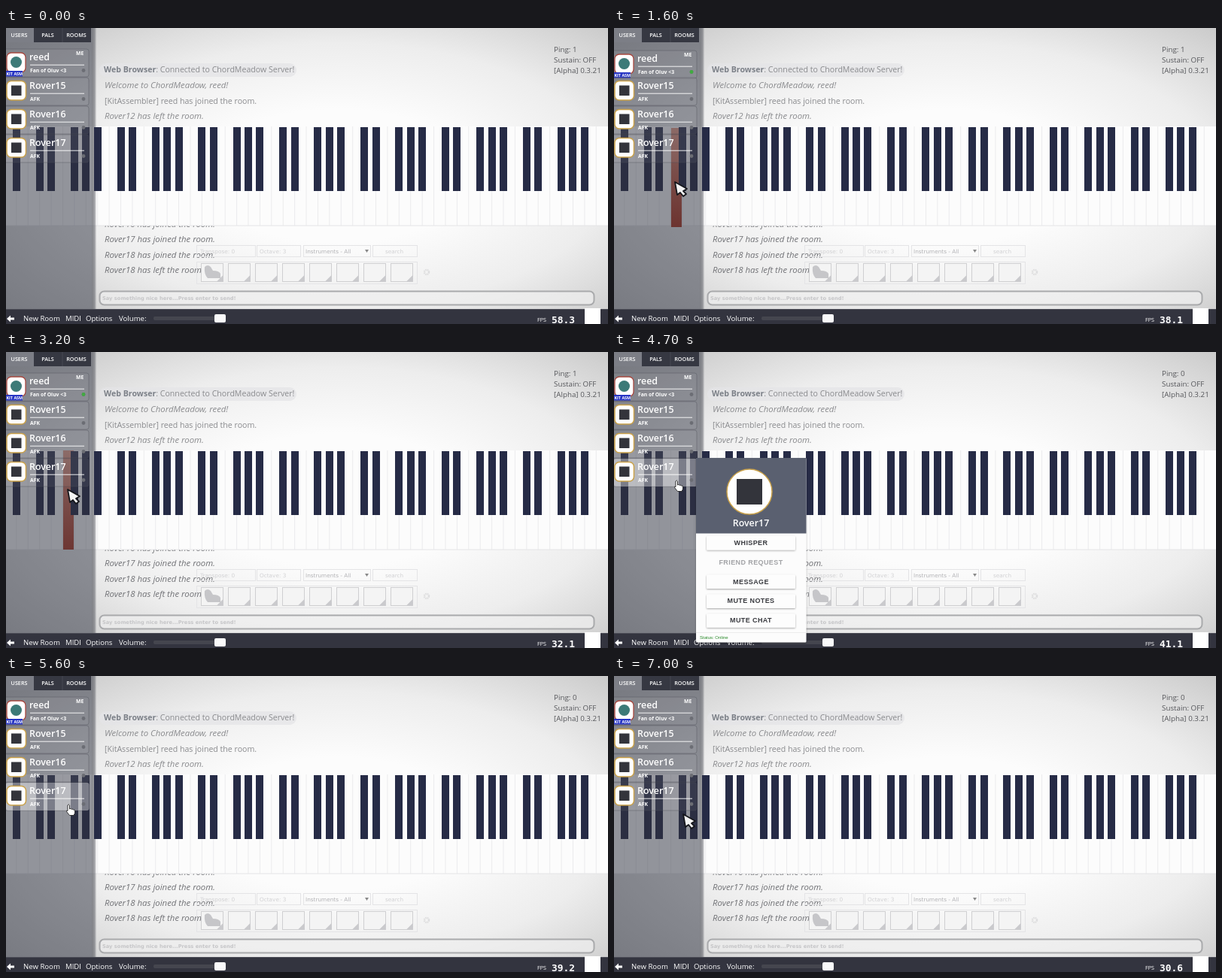
Write an HTML page that moves like this. It is 800 px wide and 394 px high and loops after 7.1 s.

```html
<!DOCTYPE html>
<html lang="en">
<head>
<meta charset="utf-8">
<title>Piano room</title>
<style>
html, body { margin: 0; width: 100%; height: 100%; overflow: hidden; background: #fff; }
svg { display: block; width: 800px; height: 394px; }
text { font-family: "Open Sans", "Noto Sans", sans-serif; white-space: pre; }
.chat { font-size: 10.6px; fill: #8a8b8e; }
.it { font-size: 11.4px; font-style: italic; fill: #717276; }
.old { fill: #8a8b8e; }
.info { font-size: 9.8px; fill: #55565a; }
.tab { font-size: 7.2px; font-weight: 600; fill: #fff; text-anchor: middle; }
.name { font-size: 12.4px; font-weight: 600; fill: #fff; }
.sub { font-size: 6.8px; font-weight: 700; fill: #fff; }
.menu { font-size: 9.6px; fill: #fff; }
.tool { font: 7.3px "DejaVu Sans", sans-serif; fill: #d2d2d4; }
.btn { font: bold 9px "Liberation Sans", Arial, sans-serif; letter-spacing: .4px; text-anchor: middle; fill: #3a3b40; }
.fps { font: bold 12.9px "DejaVu Sans Mono", monospace; fill: #fff; }
</style>
</head>
<body>
<svg id="stage" viewBox="0 0 800 394" xmlns="http://www.w3.org/2000/svg"></svg>
<script>
const LOOP = 7100, STEP = 100;
const PITCH = 15.41, KEY_X = -1.6, KEY_Y = 131, KEY_H = 132;

const rect = (x, y, w, h, fill, more = '') =>
  `<rect x="${x}" y="${y}" width="${w}" height="${h}" fill="${fill}" ${more}/>`;
const line = (x1, y1, x2, y2, stroke, more = '') =>
  `<path d="M${x1} ${y1}L${x2} ${y2}" stroke="${stroke}" ${more}/>`;
const text = (x, y, cls, s, more = '') =>
  `<text x="${x}" y="${y}" class="${cls}" ${more}>${s}</text>`;
const group = (id, body, more = '') => `<g id="${id}" ${more}>${body}</g>`;
const range = n => [...Array(n).keys()];

const defs = `<defs>
  <radialGradient id="vignette" cx=".55" cy=".5" r=".75">
    <stop offset=".3" stop-color="#fcfcfc"/><stop offset=".6" stop-color="#ededed"/>
    <stop offset=".8" stop-color="#d6d6d6"/><stop offset="1" stop-color="#bebebe"/>
  </radialGradient>
  <linearGradient id="red" x2="0" y2="1">
    <stop offset="0" stop-color="#85605c"/><stop offset="1" stop-color="#6b302c"/>
  </linearGradient>
  <linearGradient id="edge">
    <stop offset="0" stop-color="#55575f" stop-opacity=".7"/>
    <stop offset=".6" stop-color="#55575f" stop-opacity=".55"/>
    <stop offset="1" stop-color="#55575f" stop-opacity=".1"/>
  </linearGradient>
  <filter id="soft" x="-20%" y="-20%" width="140%" height="150%">
    <feDropShadow dx="0" dy="1" stdDeviation="1.2" flood-opacity=".35"/>
  </filter>
</defs>`;

function chat() {
  const left = n => `Rover${n} has left the room.`;
  const joined = n => `Rover${n} has joined the room.`;
  const italics = [
    [80, 'Welcome to ChordMeadow, reed!'], [121, left(12)],
    [265, joined(16)], [285, joined(17)], [306, joined(18)], [326, left(18)]
  ];
  return rect(124, 47, 262, 18, '#e4e5e7', 'rx="9" opacity=".75"') +
    text(130, 59.3, 'chat', '<tspan font-weight="700" fill="#7c8088">Web Browser</tspan>: Connected to ChordMeadow Server!') +
    text(131, 100.5, 'chat', '[KitAssembler] reed has joined the room.') +
    italics.map(([y, s]) => text(131, y, y < KEY_Y ? 'it old' : 'it', s)).join('');
}

function toolbar() {
  const box = (x, w) => rect(x + .5, 289.5, w, 15, 'none', 'stroke="#e4e4e6"');
  const slot = i => {
    const x = 259.5 + i * 36;
    return rect(x, 313.5, 29, 24, '#f4f4f4', 'stroke="#cfcfd1"') +
      `<path d="M${x + 29} 329v8.500h-8.500z" fill="#cacacd"/>`;
  };
  return box(253, 78) + box(333, 58) + box(395, 89) + box(487, 59) +
    text(258, 300, 'tool', 'Transpose: 0') + text(337, 300, 'tool', 'Octave: 3') +
    text(398, 300, 'tool', 'Instruments - All', 'style="fill:#b4b4b7"') +
    '<path d="M477 295h5l-2.500 4z" fill="#888"/>' +
    text(504, 300, 'tool', 'search') +
    rect(253.5, 311.5, 293, 29, 'none', 'stroke="#e4e4e6"') +
    range(8).map(slot).join('') +
    '<path d="M264 318q4-4 8 0l3 5q8 0 10 4v6h-17q-5-5-4-15z" fill="#c6c6c9"/>' +
    '<circle cx="559" cy="325" r="3" fill="none" stroke="#dededf" stroke-width="2.500" stroke-dasharray="1.600 .8"/>';
}

function piano() {
  const blacks = [1];
  for (let o = 0; o < 7; o++) for (const k of [1, 2, 4, 5, 6]) blacks.push(2 + 7 * o + k);
  const redX = KEY_X + 5 * PITCH + .5;
  return rect(0, KEY_Y, 800, KEY_H, '#fcfcfc') +
    range(52).map(i => line(KEY_X + i * PITCH, KEY_Y, KEY_X + i * PITCH, KEY_Y + KEY_H, '#ebebed')).join('') +
    line(0, KEY_Y + KEY_H, 800, KEY_Y + KEY_H, '#e4e4e6') +
    group('shade', rect(0, 0, 114, 374, '#3a3d4a', 'opacity=".54"') + rect(114, 0, 6, 374, 'url(#edge)')) +
    group('hot', rect(redX, KEY_Y, 14, KEY_H, 'url(#red)'), 'opacity="0"') +
    blacks.map(n => {
      const x = Math.round(PITCH * n - 6.6);
      return rect(x, KEY_Y + 1, 10, 85, x < 110 ? '#2b2e42' : '#262b46');
    }).join('');
}

function user(i, name, note) {
  const y = i * 38, me = i === 0;
  const face = me
    ? rect(1, 33, 25, 26, '#fff', 'rx="6" stroke="#a8483f" stroke-width="1.300"') +
      '<circle cx="13.500" cy="45.500" r="7.500" fill="#3d7a78"/>' +
      rect(0, 57, 22, 7.5, '#2735c4') + text(.5, 63, 'sub', 'KIT ASM', 'style="font-size:5.400px"')
    : rect(1, y + 32.5, 25.5, 25.5, '#fff', 'rx="6" stroke="#c9a14a" stroke-width="1.500"') +
      rect(7, y + 38.5, 13.5, 13.5, '#33343b');
  return group('row' + i,
    `<path d="M0 ${y + 65}H107q3 0 3-3V${y + 31}q0-3-3-3H0" fill="#fff" fill-opacity=".05" stroke="#4c4e58" stroke-opacity=".4"/>` +
    rect(0, y + 28, 110.5, 37, '#fff', `id="glow${i}" rx="3" opacity="0"`) + face +
    text(31, y + 43, 'name', name) +
    (me ? text(93, 35.5, 'sub', 'ME') : '') +
    line(32, y + 49.2, 104, y + 49.2, '#fff', 'stroke-width=".9"') +
    text(32, y + 58.8, 'sub', note) +
    `<circle cx="103" cy="${y + 56.5}" r="2.400" fill="#6b6d74"/>` +
    (me ? '<circle id="dot" cx="103" cy="56.500" r="2.400" fill="#3fae3f" opacity="0"/>' : ''));
}

function sidebar() {
  return rect(0, 0, 37, 19, '#7c7e86') + rect(37, 0, 76, 19, '#363842') +
    line(75, 0, 75, 19, '#464852') +
    [['USERS', 17.5], ['PALS', 55.5], ['ROOMS', 93.5]].map(([s, x]) => text(x, 12, 'tab', s)).join('') +
    user(0, 'reed', 'Fan of Oluv &lt;3') +
    [15, 16, 17].map((n, i) => user(i + 1, 'Rover' + n, 'AFK')).join('');
}

function footer() {
  const items = [[23, 'New Room'], [79, 'MIDI'], [106, 'Options'], [150, 'Volume:']];
  return rect(124.5, 350.5, 657, 18, '#f0f0f0', 'rx="6" stroke="#a9aaac" stroke-width="2" fill-opacity=".7"') +
    text(128, 362, 'tool', 'Say something nice here...Press enter to send!', 'style="font-size:6.700px;font-weight:700;fill:#c6c6c8"') +
    rect(0, 374, 800, 20, '#33343f') + line(0, 374.5, 800, 374.5, '#4d4e58') +
    '<path d="M1 387l5-4.500v3h5v3h-5v3z" fill="#fff"/>' +
    items.map(([x, s]) => text(x, 390, 'menu', s)).join('') +
    rect(196, 384, 96, 5, '#45464f', 'rx="2"') +
    rect(277, 381, 15, 11, '#fafafa', 'rx="2"') +
    text(706, 390.5, 'menu', 'FPS', 'style="font-size:7.200px"') +
    text(725, 392.7, 'fps', '', 'id="fps"') +
    rect(769, 373, 21, 21, '#fff');
}

function popup() {
  const labels = ['WHISPER', 'FRIEND REQUEST', 'MESSAGE', 'MUTE NOTES', 'MUTE CHAT'];
  const button = (s, i) => {
    const y = 245 + i * 25.8, flat = i === 1;
    return (flat ? '' : rect(123, y, 118, 18.5, '#fdfdfd', 'rx="1.500" filter="url(#soft)"')) +
      text(182, y + 12, 'btn', s, flat ? 'style="fill:#a2a3a6"' : '');
  };
  return group('popup',
    rect(109, 141, 146.5, 245.5, '#fcfcfc', 'rx="1.500" filter="url(#soft)"') +
    rect(109, 141, 146.5, 100.5, '#5a6070') +
    '<circle cx="180" cy="186" r="30" fill="#fff" stroke="#c9a14a" stroke-width="1.500"/>' +
    rect(163, 169, 34, 34, '#33343b') +
    text(182, 232, 'name', 'Rover17', 'text-anchor="middle"') +
    labels.map(button).join('') +
    line(109, 373.5, 255.5, 373.5, '#ececec') +
    text(114, 382, 'btn', 'Status: Online',
      'style="font-size:6px;font-weight:400;letter-spacing:0;text-anchor:start;fill:#2a8a2a"'),
    'opacity="0"');
}

const cursors =
  group('arrow', '<path d="M0 0L3 17L7 14L11 19L15 16L11 12L16 9Z" fill="#f4f4f4" stroke="#15161b" stroke-width="1.800" stroke-linejoin="round"/>') +
  group('hand', '<path d="M0 1q1.500-2 2.500 0v5q2-1.300 2.500.4q2-.9 2.500.7q2-.5 2 1.200v3.200l-1.500 3h-5.500l-4-5q-.4-2 1.500-1z" fill="#fff" stroke="#222" stroke-width=".9" stroke-linejoin="round"/>');

document.getElementById('stage').innerHTML = defs +
  rect(0, 0, 800, 394, 'url(#vignette)') + chat() + toolbar() +
  text(728, 32, 'info', '', 'id="ping"') + text(728, 46, 'info', 'Sustain: OFF') +
  text(728, 60, 'info', '[Alpha] 0.3.21') +
  piano() + sidebar() + footer() + popup() + cursors;

const $ = id => document.getElementById(id);
const set = (id, name, value) => $(id).setAttribute(name, value);

// Each row: time, then values, joined linearly
const pointer = [[500, 190, 300], [1200, 81, 205], [2600, 81, 205], [3100, 82, 183], [3200, 82, 183],
  [3500, 82, 171], [6300, 82, 171], [6700, 92, 184], [7100, 92, 184]];
const rates = [[0, 58.3], [1600, 38.1], [2500, 29.6], [3200, 32.1], [4700, 41.1], [5600, 39.2], [7000, 30.6], [7100, 30.6]];
const fade = [[4200, 0], [4400, 1], [5100, 1], [5300, 0]];
const hits = [1500, 3000], RELEASE = 3500;

function at(track, t) {
  if (t <= track[0][0]) return track[0].slice(1);
  const i = track.findIndex(k => k[0] >= t);
  if (i < 0) return track[track.length - 1].slice(1);
  const a = track[i - 1], b = track[i], p = (t - a[0]) / (b[0] - a[0]);
  return a.slice(1).map((v, j) => v + (b[j + 1] - v) * p);
}

function draw(t) {
  const hit = hits.filter(h => h <= t).pop();
  const age = hit === undefined ? Infinity : t - hit;
  const heat = Math.exp(-age / 3000) * Math.max(0, Math.min(1, 1 - (t - RELEASE) / 300));
  const dip = age < 200 ? 2 : 0;
  set('hot', 'opacity', heat);
  set('hot', 'transform', `translate(0 ${dip})`);
  set('row0', 'transform', `translate(0 ${dip})`);
  set('dot', 'opacity', heat);

  const [x, y] = at(pointer, t);
  const over = t >= 3400 && y < 179;
  set('arrow', 'transform', `translate(${x} ${y})`);
  set('hand', 'transform', `translate(${x} ${y})`);
  set('arrow', 'opacity', t >= 500 && !over ? 1 : 0);
  set('hand', 'opacity', over ? 1 : 0);
  set('glow3', 'opacity', over ? .34 : 0);

  set('popup', 'opacity', at(fade, t)[0]);
  $('fps').textContent = at(rates, t)[0].toFixed(1);
  $('ping').textContent = 'Ping: ' + (t < 4200 ? 1 : 0);
}

const start = performance.now();
function tick() {
  const t = (performance.now() - start) % LOOP;
  draw(Math.floor(t / STEP) * STEP);
  requestAnimationFrame(tick);
}
tick();
</script>
</body>
</html>
```
